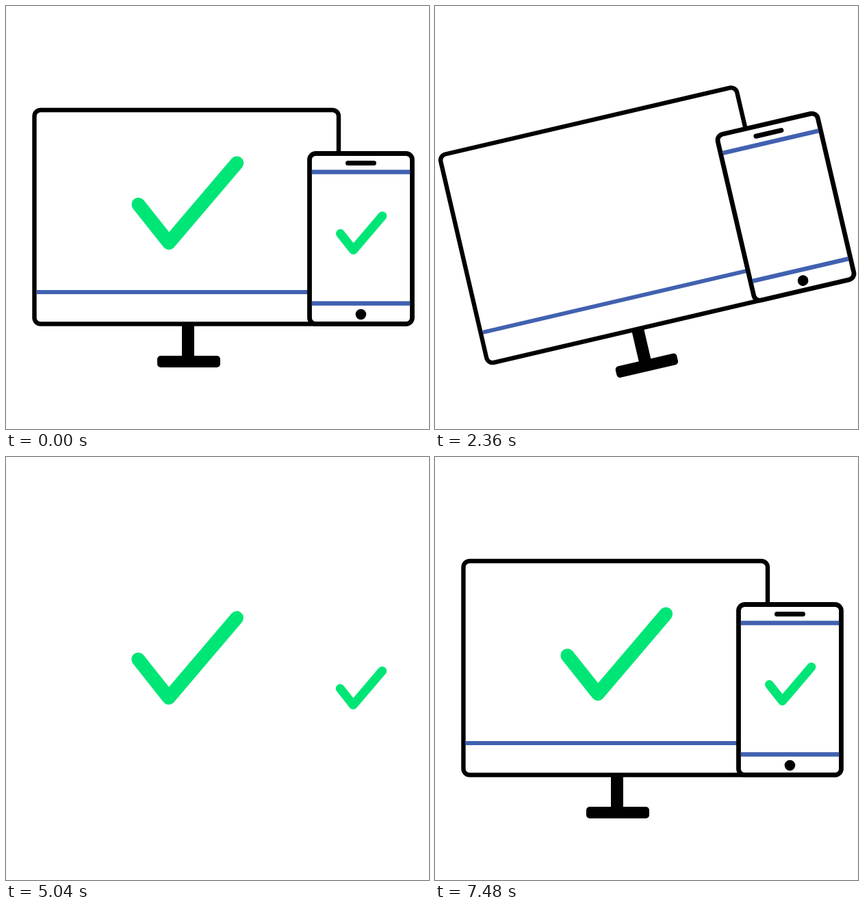
Animation of 618 by 618 pixels, one loop 8.58 s. Source, as an HTML page with a canvas:

```html
<!DOCTYPE html>
<html lang="en">
<head>
<meta charset="utf-8">
<title>Devices and check marks</title>
<style>
  html, body { margin: 0; width: 100%; height: 100%; overflow: hidden; background: #fff; }
  canvas { display: block; width: 100vw; height: 100vh; }
</style>
</head>
<body>
<canvas id="stage" width="618" height="618"></canvas>
<script>
const ctx = document.getElementById('stage').getContext('2d');
const SIZE = 618, LOOP = 8580, TICK = 40, BEAT = 1000, MOVE = 480;
const BLACK = '#000', WHITE = '#fff', BLUE = '#4161b0', GREEN = '#00e676';
const CENTER = { x: 317.5, y: 338.5 };

const ease = p => p < 0.5 ? 2 * p * p : 1 - 2 * (1 - p) ** 2;

// Eased 0 to 1 at the start of a beat.
const step = (time, beat) =>
  ease(Math.min(Math.max((time - beat * BEAT) / MOVE, 0), 1));

// Rises to 1 on one beat and falls back to 0 on a later one.
const between = (time, from, to) => step(time, from) - step(time, to);

function box(x, y, w, h, radius, lineWidth) {
  ctx.beginPath();
  ctx.roundRect(x, y, w, h, radius);
  ctx.fillStyle = lineWidth ? WHITE : BLACK;
  ctx.fill();
  if (!lineWidth) return;
  ctx.lineWidth = lineWidth;
  ctx.strokeStyle = BLACK;
  ctx.stroke();
}

function bar(x, y, length, width, color, cap = 'butt') {
  ctx.beginPath();
  ctx.moveTo(x, y);
  ctx.lineTo(x + length, y);
  ctx.lineWidth = width;
  ctx.strokeStyle = color;
  ctx.lineCap = cap;
  ctx.stroke();
}

function drawMonitor() {
  box(257, 462, 18, 54, 0);
  box(221, 511, 92, 17, 5);
  box(41.5, 152, 444.5, 312.5, 9, 6.4);
  bar(44.5, 418, 397.5, 6, BLUE);
}

function drawPhone() {
  box(443.5, 215.5, 150, 249, 9, 6.8);
  bar(446.8, 242.5, 143.4, 6.5, BLUE);
  bar(446.8, 434.5, 143.4, 6.5, BLUE);
  bar(499.5, 229.5, 38, 7, BLACK, 'round');
  ctx.beginPath();
  ctx.arc(518.5, 450.5, 7.8, 0, Math.PI * 2);
  ctx.fillStyle = BLACK;
  ctx.fill();
}

// A check mark of the given short-arm width, with its corner at x, y.
function drawCheck(x, y, arm, width) {
  ctx.beginPath();
  ctx.moveTo(x - arm, y - arm * 1.26);
  ctx.lineTo(x, y);
  ctx.lineTo(x + arm * 2.23, y - arm * 2.62);
  ctx.lineWidth = width;
  ctx.strokeStyle = GREEN;
  ctx.lineCap = ctx.lineJoin = 'round';
  ctx.stroke();
}

function drawDevices(offsetY, tilt) {
  ctx.save();
  ctx.translate(CENTER.x, CENTER.y + offsetY);
  ctx.rotate(-tilt * Math.PI / 180);
  ctx.translate(-CENTER.x, -CENTER.y);
  drawMonitor();
  ctx.translate(-tilt / 12, 0);
  drawPhone();
  ctx.restore();
}

function drawChecks(offsetX, offsetY) {
  ctx.save();
  ctx.translate(offsetX, offsetY);
  drawCheck(238, 346, 44.5, 20);
  drawCheck(507.5, 356.5, 19, 13);
  ctx.restore();
}

function draw(time) {
  const aside = between(time, 0, 1);
  const settled = between(time, 1, 6);
  const tilted = between(time, 2, 3);
  const devicesUp = between(time, 4, 6);
  const checksDown = between(time, 5, 7);
  const drift = between(time, 5, 6);

  ctx.fillStyle = WHITE;
  ctx.fillRect(0, 0, SIZE, SIZE);
  drawDevices(-26 * aside - settled - 620 * devicesUp, 15 * tilted);
  drawChecks(542 * aside - 660 * tilted - 17 * drift,
             -14 * aside - 1.4 * settled + 512 * checksDown);
}

let start;
function frame(now) {
  start ??= now;
  const time = (now - start) % LOOP;
  draw(Math.floor(time / TICK) * TICK);
  requestAnimationFrame(frame);
}

draw(0);
requestAnimationFrame(frame);
</script>
</body>
</html>
```
